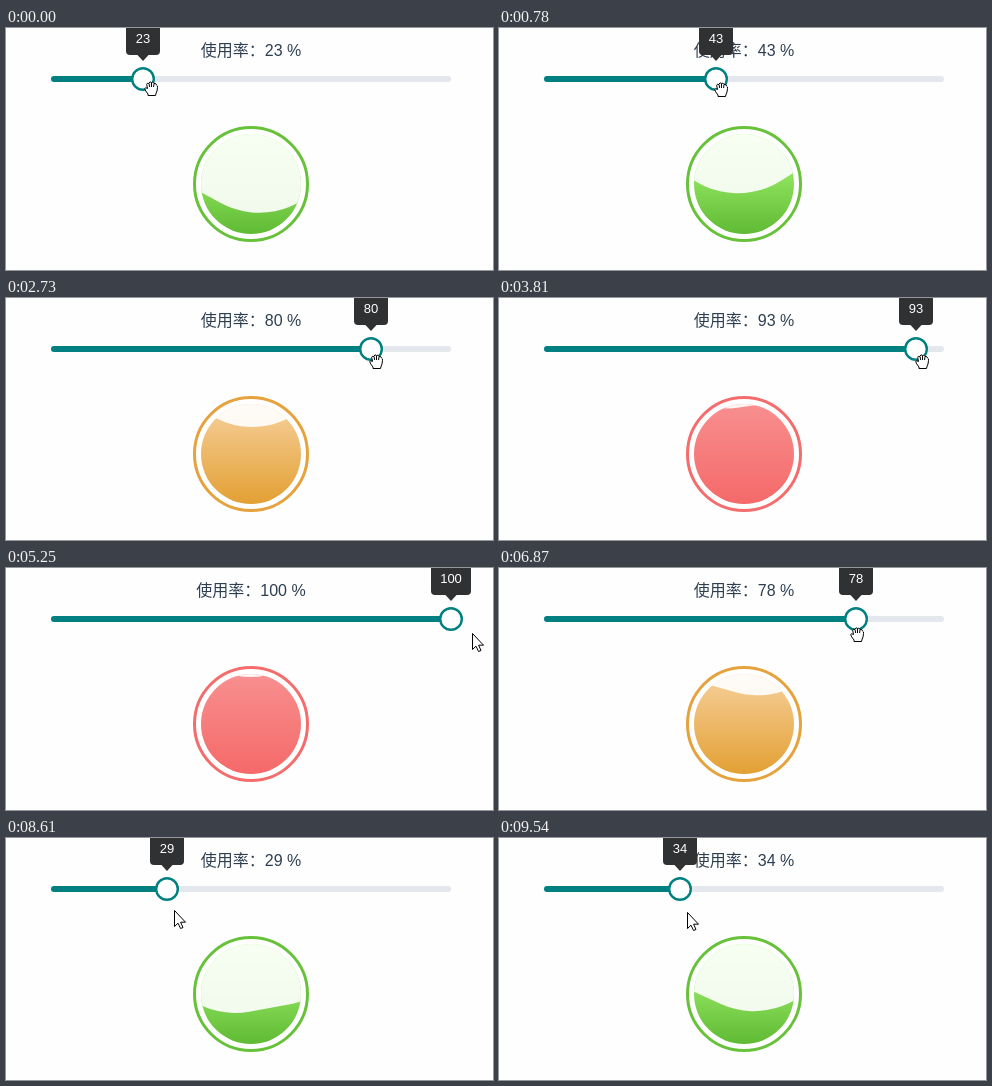
These frames come from a looping animation (487x242 px, 9.64 s). An HTML page:

```html
<!DOCTYPE html>
<html lang="zh">
<head>
<meta charset="utf-8">
<style>
html, body { margin: 0; width: 100%; height: 100%; overflow: hidden; background: #fefefe; }
svg { display: block; }
text { font-family: "Liberation Sans", Arial, "Noto Sans CJK SC", "Noto Sans CJK", sans-serif; text-anchor: middle; }
#label { font-weight: 300; }
</style>
</head>
<body>
<svg width="487" height="242" viewBox="0 0 487 242">
  <defs>
    <linearGradient id="liquid" x1="0" y1="0" x2="0" y2="1">
      <stop id="light" offset="0"/>
      <stop id="deep" offset="1"/>
    </linearGradient>
    <clipPath id="bowl"><circle cx="245" cy="156" r="50"/></clipPath>
  </defs>

  <text id="label" x="245" y="28" font-size="16" fill="#2c3e50"></text>

  <rect x="45" y="48" width="400" height="6" rx="3" fill="#e4e7ed"/>
  <rect id="bar" x="45" y="48" height="6" rx="3" fill="#008080"/>

  <circle id="ring" cx="245" cy="156" r="56.5" fill="#fff" stroke-width="3"/>
  <circle cx="245" cy="156" r="50" fill="url(#liquid)"/>
  <g clip-path="url(#bowl)">
    <rect id="wave" x="-100" y="-100" width="200" height="200" rx="80" fill="#fff" fill-opacity=".9"/>
  </g>

  <g id="knob">
    <circle cy="51" r="10.8" fill="#fff" stroke="#008080" stroke-width="2.4"/>
    <rect id="tip" y="-8" height="35" rx="4" fill="#303133"/>
    <path d="M-6 26.5H6L0 33Z" fill="#303133"/>
    <text id="tipText" y="15" font-size="13" fill="#fff"></text>
  </g>

  <g id="cursor" fill="#fff" stroke="#000" stroke-linejoin="round">
    <path id="hand" d="M4 14.5V13Q1 9.5 .7 7.5Q1.5 6 3.5 7.5L2.7 3.5Q3 1.5 4.8 2.5Q6 -.4 7.4 1.5Q9 .3 10 2.4Q12 1.8 12.5 4Q13.8 4.5 13.5 6.5L13 10Q12 12 11.5 14.5ZM5 2.5L5.7 6M7.5 1.7V6M10 2.5L9.6 6"/>
    <path id="arrow" d="M.5 .5V16.5L4 13.2L6.6 18.5L9 17.5L6.6 12.2H11.5Z"/>
  </g>
</svg>
<script>
const LOOP = 9640, STEP = 132, LAST = 72;
const $ = id => document.getElementById(id);
const set = (id, attrs) => {
  for (const name in attrs) $(id).setAttribute(name, attrs[name]);
};

// Where the pointer drags to: [step, percent]; past 100 it leaves the track
const drag = [
  [0, 23], [12, 62], [21, 80], [33, 100], [40, 103.5], [43, 100],
  [50, 88], [52, 78], [59, 43], [68, 22], [72, 34]
];

function pointerAt(step) {
  const i = Math.max(1, drag.findIndex(key => key[0] >= step));
  const [s0, a] = drag[i - 1], [s1, b] = drag[i];
  return a + (b - a) * (step - s0) / (s1 - s0);
}

function palette(value) {
  if (value <= 60) return ['#b0ff7c', '#60ba33', '#67c23a'];
  if (value <= 80) return ['#f6d09c', '#e3a033', '#e6a23c'];
  return ['#f88f8f', '#f56969', '#f56c6c'];
}

function draw(now) {
  const step = Math.min(LAST, Math.floor(now % LOOP / STEP + .4));
  const pointer = pointerAt(step);
  const value = Math.round(Math.min(100, pointer));
  const x = 45 + 4 * value;
  const [light, deep, ring] = palette(value);
  const tipWidth = value > 99 ? 40 : 34;

  $('label').textContent = `使用率：${value} %`;
  $('tipText').textContent = value;
  set('tip', { x: -tipWidth / 2, width: tipWidth });
  set('bar', { width: 4 * value });
  set('knob', { transform: `translate(${x} 0)` });

  set('ring', { stroke: ring });
  set('light', { 'stop-color': light });
  set('deep', { 'stop-color': deep });
  set('wave', { transform: `translate(245 ${100.7 - value}) rotate(${28 + 4.95 * step})` });

  // The pointer sinks slowly and turns into an arrow once it is off the knob
  const free = pointer > 100 || step > 55;
  const dx = free ? 7 : 1 - .13 * step;
  const y = free ? 54 + .28 * step : 53 + .12 * step;
  set('cursor', { transform: `translate(${Math.round(45 + 4 * pointer + dx)} ${Math.round(y)})` });
  set('arrow', { visibility: free ? 'visible' : 'hidden' });
  set('hand', { visibility: free ? 'hidden' : 'visible' });
}

const begin = performance.now();
function tick() {
  draw(performance.now() - begin);
  requestAnimationFrame(tick);
}
tick();
</script>
</body>
</html>
```
